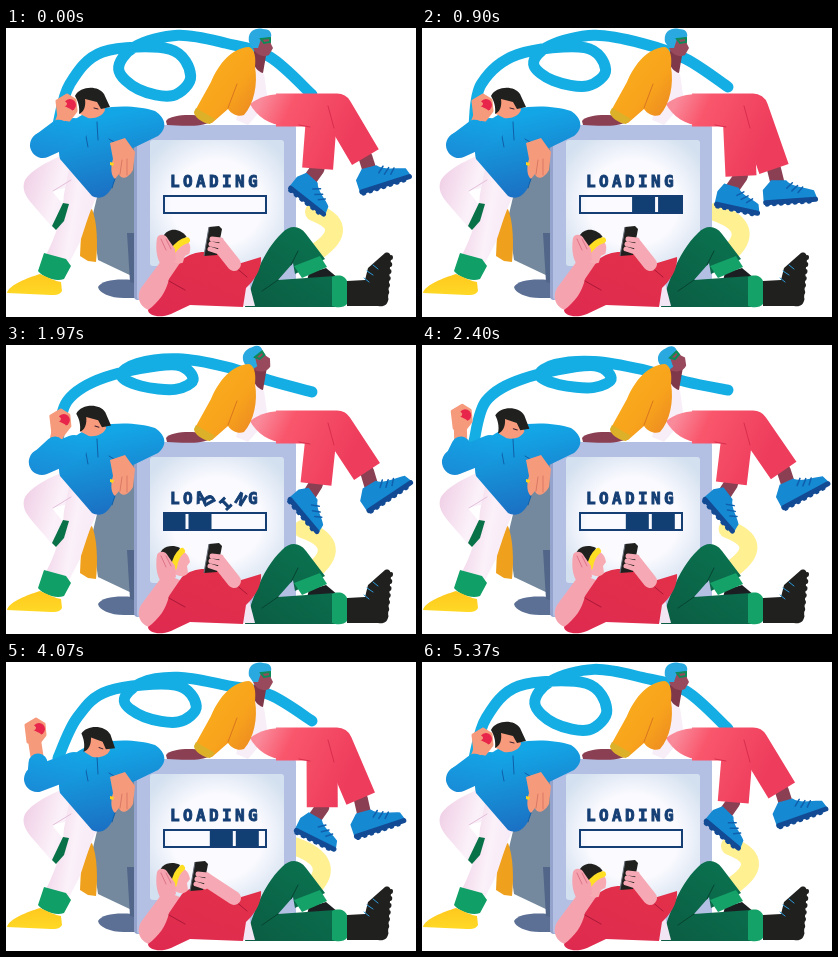
These frames come from a looping animation (410x289 px, 5410 ms). An HTML page:

```html
<!DOCTYPE html>
<html lang="en">
<head>
<meta charset="utf-8">
<title>Loading</title>
<style>
html, body { margin: 0; width: 100%; height: 100%; overflow: hidden; background: #fff; }
svg { display: block; width: 410px; height: 289px; }
.word { font: bold 16px "DejaVu Sans Mono", "Noto Sans Mono", monospace; fill: #153f74; stroke: #153f74; stroke-width: .9; }
.line { fill: none; stroke-linecap: round; stroke-linejoin: round; }
</style>
</head>
<body>
<svg viewBox="0 0 410 289">
  <defs>
    <linearGradient id="hoodie" x1="0" y1="0" x2=".25" y2="1">
      <stop offset=".2" stop-color="#13a6e6"/><stop offset="1" stop-color="#1b72c4"/>
    </linearGradient>
    <linearGradient id="sleeve" gradientUnits="userSpaceOnUse" x1="50" y1="85" x2="40" y2="134">
      <stop offset="0" stop-color="#13a6e6"/><stop offset="1" stop-color="#1a8ad6"/>
    </linearGradient>
    <linearGradient id="coral" gradientUnits="userSpaceOnUse" x1="245" y1="92" x2="335" y2="135">
      <stop offset="0" stop-color="#f98a9a"/><stop offset=".3" stop-color="#f9566c"/><stop offset="1" stop-color="#ee3c5c"/>
    </linearGradient>
    <linearGradient id="jacket" x1="0" y1="0" x2="1" y2="1">
      <stop offset="0" stop-color="#fbb01c"/><stop offset=".6" stop-color="#f8a31c"/><stop offset="1" stop-color="#e98423"/>
    </linearGradient>
    <linearGradient id="shirt" x1="0" y1="1" x2=".7" y2="0">
      <stop offset="0" stop-color="#df2a50"/><stop offset="1" stop-color="#e2304a"/>
    </linearGradient>
    <linearGradient id="white" x1="0" y1=".3" x2="1" y2=".6">
      <stop offset="0" stop-color="#f0cfe6"/><stop offset=".5" stop-color="#fbf1f9"/><stop offset="1" stop-color="#f4e6f5"/>
    </linearGradient>
    <linearGradient id="green" x1="0" y1="1" x2=".8" y2="0">
      <stop offset="0" stop-color="#0b5c42"/><stop offset="1" stop-color="#0a7350"/>
    </linearGradient>
    <linearGradient id="yellow" x1="0" y1="0" x2="0" y2="1">
      <stop offset="0" stop-color="#ffc81c"/><stop offset="1" stop-color="#ffd927"/>
    </linearGradient>
    <radialGradient id="glass" r=".62">
      <stop offset=".55" stop-color="#fafaff"/><stop offset="1" stop-color="#d3e0ef"/>
    </radialGradient>
    <clipPath id="slot"><path d="M158 168h103v17h-103z"/></clipPath>
  </defs>

  <path id="cable" class="line" stroke="#14aee4" stroke-width="11"/>
  <path id="tail" class="line" stroke="#fff092" stroke-width="18"/>

  <g id="monitor">
    <path d="M130 112L92 165L86 190L92 232L130 250Z" fill="#74899d"/>
    <path d="M92 259C96 251 116 250 136 253V270H118C104 270 93 265 92 259Z" fill="#5c7096"/>
    <path d="M121 205H133V256L124 254Z" fill="#516689"/>
    <rect x="128" y="98" width="14" height="174" rx="4" fill="#93a3cb"/>
    <rect x="131" y="97" width="159" height="175" rx="3" fill="#b3c0e4"/>
    <rect x="144" y="112" width="134" height="126" rx="3" fill="url(#glass)"/>
    <g id="letters" class="word"></g>
    <g clip-path="url(#slot)">
      <path id="blocks" d="M0 169h23v15h-23zM26 169h23v15h-23z" fill="#123f73"/>
    </g>
    <rect x="158" y="168" width="102" height="17" fill="none" stroke="#153f74" stroke-width="2"/>
  </g>

  <g id="sitter">
    <path d="M247 38L258 46L262 74L242 97L230 92Z" fill="#f8eef8"/>
    <path d="M250 18L261 22L257 45C252 44 247 38 246 30Z" fill="#7e3849"/>
    <g id="sitterHead">
      <path d="M247 10L264 7L265 16L267 20L263 27C258 30 250 27 247 20Z" fill="#984a5c"/>
      <path d="M243 14C241 3 250 -1 257 1C264 1 266 5 265 9L255 11L252 20L247 20Z" fill="#29a9df"/>
      <path d="M255 11L264 10L264 14L258 15Z" fill="none" stroke="#0c8a58" stroke-width="2"/>
    </g>
    <g class="line" stroke="#8b3f52" stroke-width="14">
      <path id="ankleR"/><path id="ankleL"/>
    </g>
    <path d="M244 76C255 68 265 66 278 66V98C264 97 250 88 244 76Z" fill="url(#coral)"/>
    <g class="line" stroke="url(#coral)" stroke-width="31" style="stroke-linecap:butt">
      <path id="legR"/>
      <path id="legL"/>
    </g>
    <path class="line" d="M304 99L293 97M328 100L322 78" stroke="#d92d4e"/>
    <g id="shoeR"></g>
    <g id="shoeL"></g>
    <path d="M160 93C164 87 183 86 196 88L204 94C197 99 176 98 161 97Z" fill="#8b3f52"/>
    <path d="M243 19C226 20 213 35 205 54L190 81C188 88 197 95 206 95L222 81C226 87 233 89 238 87C248 76 252 56 249 39C250 30 249 21 243 19Z" fill="url(#jacket)"/>
    <path d="M190 80L209 91L204 96C196 95 188 89 188 84Z" fill="#dcb029"/>
    <path class="line" d="M222 80L231 56" stroke="#d97620"/>
  </g>

  <g id="leaner">
    <path d="M76 186L86 181C91 193 92 215 90 234L82 233L74 228Z" fill="#efa01d"/>
    <path d="M60 126C44 132 25 142 19 152C15 161 20 169 27 177L46 199L58 178L46 163L88 153Z" fill="url(#white)"/>
    <path d="M64 137L96 160C85 176 80 197 74 214L62 237L40 227C50 208 57 186 58 166Z" fill="url(#white)"/>
    <path d="M46 198L57 175L63 176L58 193L50 202Z" fill="#087147"/>
    <path class="line" d="M47 163L65 152" stroke="#e3bfda"/>
    <path d="M38 225L60 231L65 238L58 251C50 254 38 250 32 243Z" fill="#109f66"/>
    <path d="M34 246C43 250 49 253 55 254L56 263C54 267 50 267 45 267L1 265C3 257 21 250 34 246Z" fill="url(#yellow)"/>
    <path d="M76 87C94 77 128 76 149 83C161 91 161 101 152 108L121 123L107 157C102 169 94 172 86 168L54 131C50 113 59 96 76 87Z" fill="url(#hoodie)"/>
    <path class="line" d="M78 98L82 119M91 94L92 112M118 120L103 111M121 123C113 138 109 150 106 160" stroke="#105fa8"/>
    <path d="M104 115L119 110L129 124L127 142C122 151 115 152 113 146L109 151C104 147 105 137 107 131Z" fill="#f69a7c"/>
    <path class="line" d="M116 132L114 146M121 131L121 147" stroke="#d97865"/>
    <path d="M104 134L108 135L107 138L104 137Z" fill="#ffd21d"/>
    <g id="leanerHead">
      <path d="M75 69L97 70L99 82C97 88 89 91 82 90L74 86Z" fill="#f79b7c"/>
      <path d="M69 68C74 58 92 57 98 66L104 79L95 81L91 74L79 71C80 78 78 84 73 86C74 79 72 73 69 68Z" fill="#20211f"/>
      <path class="line" d="M88 80L92 81" stroke="#3b2030"/>
    </g>
    <path id="forearm" class="line" stroke="#f69a7c" stroke-width="13"/>
    <path id="arm" class="line" stroke="url(#sleeve)" stroke-width="26"/>
    <path id="cuff" class="line" stroke="url(#sleeve)" stroke-width="19"/>
    <g id="apple">
      <path d="M-13 -4L-3 -10L5 -5L6 6L-1 15L-11 13Z" fill="#f69a7c" stroke="#f69a7c" stroke-width="3" stroke-linejoin="round"/>
      <circle r="6" fill="#e8254a"/>
      <path class="line" d="M-8 2L-4 4L0 6M-8 -3L-5 -1" stroke="#f69a7c" stroke-width="4"/>
    </g>
  </g>

  <g id="reader">
    <path d="M303 245L320 240L332 250L326 256H300Z" fill="#1c1f22"/>
    <path d="M341 253L359 252L362 240L379 225C385 223 386 229 384 239L382 271C382 277 378 279 372 278H341Z" fill="#20211f"/>
    <path class="line" d="M385 229L380 275" stroke="#20211f" stroke-width="4" stroke-dasharray="1 6"/>
    <path class="line" d="M358 250L363 254M361 243L367 247M367 237L372 241" stroke="#2e9bdc"/>
    <path d="M239 279C247 252 257 223 276 205C284 197 293 197 300 206L319 231L289 246L287 235L272 252L329 248V279Z" fill="url(#green)"/>
    <path class="line" d="M272 252L256 263M285 237L292 223" stroke="#074330"/>
    <path d="M288 238L314 228L321 239L296 250Z" fill="#14a268"/>
    <path d="M326 249C333 246 339 248 341 253V276C338 280 331 280 326 278Z" fill="#14a268"/>
    <path d="M235 264L242 251L249 278H236Z" fill="#f2e6f5"/>
    <path d="M158 229L174 235L166 258L180 262L151 283C138 284 128 273 135 260Z" fill="#f6a3b0"/>
    <path d="M176 232C191 219 215 223 232 236L255 229C256 241 248 253 240 260L237 279L184 277L165 286C153 291 142 287 142 282C153 274 160 264 163 251Z" fill="url(#shirt)"/>
    <path class="line" d="M163 253L179 262M228 238L241 249" stroke="#aa1838"/>
    <g id="readerHead">
      <path d="M173 206C181 206 183 212 184 217L181 221L182 228C177 234 168 231 164 223Z" fill="#f8aab2"/>
      <path d="M153 213C153 203 164 198 174 203L168 216L160 222Z" fill="#20211f"/>
      <path class="line" d="M176 206C171 210 169 215 168 222" stroke="#ffdf24" stroke-width="6"/>
    </g>
    <path d="M151 210C153 205 160 206 162 211L169 221L170 232L158 240C151 234 149 222 151 210Z" fill="#f6a3b0"/>
    <path class="line" d="M155 211L160 222M160 211L165 221" stroke="#dc7488"/>
    <path id="readerArm" class="line" stroke="#f6a9b4" stroke-width="14"/>
    <g id="phone">
      <path d="M203 199L213 198L216 201L211 227L198 228Z" fill="#20211f"/>
      <path d="M203 199L198 228" stroke="#6a6f7a" fill="none"/>
      <path class="line" d="M206 211L215 212M205 216L214 218M204 221L213 224" stroke="#f6a9b4" stroke-width="5"/>
    </g>
  </g>
</svg>

<script>
const LOOP = 5410;
const RUNS = [43, 1600, 3270];
const el = id => document.getElementById(id);
const draw = (id, d) => el(id).setAttribute("d", d);
const place = (id, x, y, turn = 0, px = 0, py = 0) =>
  el(id).setAttribute("transform", `translate(${x} ${y}) rotate(${turn} ${px} ${py})`);

// Cosine with a whole number of cycles per loop; shift is a part of one cycle.
const wave = (t, cycles = 1, shift = 0) => Math.cos(2 * Math.PI * (cycles * t / LOOP + shift));
const ease = u => (u = Math.min(1, Math.max(0, u))) * u * (3 - 2 * u);
// Rises from 0 to 1 between a and b, falls back between c and d.
const hold = (t, a, b, c, d) => ease((t - a) / (b - a)) - ease((t - c) / (d - c));

function spline(pts) {
  let d = `M${pts[0]}`;
  for (let i = 0; i < pts.length - 1; i++) {
    const [a, b, c, e] = [pts[i - 1] || pts[i], pts[i], pts[i + 1], pts[i + 2] || pts[i + 1]];
    d += `C${b.map((v, k) => v + (c[k] - a[k]) / 6)} ${c.map((v, k) => v - (e[k] - b[k]) / 6)} ${c}`;
  }
  return d;
}

for (const ch of "LOADING") {
  const letter = document.createElementNS("http://www.w3.org/2000/svg", "text");
  letter.textContent = ch;
  el("letters").append(letter);
}
for (const [id, half] of [["shoeL", 23], ["shoeR", 27]]) {
  el(id).innerHTML =
    `<path d="M${-half} -4L-18 -13L-3 -12C2 -5 14 -4 ${half - 3} 0L${half} 9L${-half} 9Z" fill="#1689d3"/>` +
    `<path class="line" d="M${2 - half} 9H${half - 2}" stroke="#124a94" stroke-width="5"/>` +
    `<path class="line" d="M${3 - half} 11H${half - 3}" stroke="#124a94" stroke-width="4" stroke-dasharray="1 6"/>` +
    `<path class="line" d="M-3 -4L3 -9M2 -1L8 -6M8 1L13 -4" stroke="#0f5fac" stroke-width="1.5"/>`;
}

function drawCable(t) {
  const cx = 151.5 - 4 * wave(t, 1, -.125), cy = 36 + 6 * wave(t, 1, .08);
  const rx = 36, ry = 19.5 + 7 * wave(t, 1, .03);
  const crest = 12.5 - 6 * wave(t, 1, -.08);
  draw("cable", spline([
    [52, 96], [65 - 6 * wave(t, 1, -.22), 56], [cx - 52, 29 - 5 * wave(t)],
    [cx + .42 * rx, cy - .76 * ry], [cx + rx, cy + .25 * ry],
    [cx + .5 * rx, cy + ry], [cx - .45 * rx, cy + .76 * ry], [cx - rx, cy],
    [cx - .55 * rx, cy - .85 * ry], [172, crest], [220, crest + 8],
    [264, 33 - 4 * wave(t)], [306, 56 + 11 * wave(t, 1, .04)]
  ]));
  const sway = wave(t, 2);
  draw("tail", `M${298 + 10 * sway} 184Q${342 + 8 * sway} 200 304 228`);
}

function drawLeg(side, hip, knee, hem, shoe, turn) {
  const a = turn * Math.PI / 180, [sx, sy] = shoe;
  draw("leg" + side, `M${hip}L${knee}L${hem}`);
  draw("ankle" + side, `M${hem}L${sx - 11 * Math.cos(a) + 5 * Math.sin(a)} ${sy - 11 * Math.sin(a) - 5 * Math.cos(a)}`);
  place("shoe" + side, sx, sy, turn);
}

function drawSitter(t) {
  const s = wave(t, 2, .17);
  drawLeg("R", [270, 81], [331, 81], [357 + 5 * s, 133 - 8 * s],
    [374 + 6 * s, 153 - 11 * s], -18 + 16 * wave(t, 2, -.25));
  drawLeg("L", [270, 83], [316, 83], [314 - 5 * s, 143 - 5 * s],
    [310 - 7 * s, 168 - 4 * s], 32 + 20 * wave(t, 2, .2));
  place("sitterHead", 0, 0, -38 * hold(t, 1000, 2300, 2500, 4000), 254, 22);
}

function drawLeaner(t) {
  const away = hold(t, 1600, 2900, 4200, 5100);
  const elbow = 37 - 6 * away, wx = 53 - 21 * away, wy = 101;
  const px = 64 - 31 * away, py = 77 - 10 * away;
  draw("arm", `M68 103L${elbow} 117`);
  draw("cuff", `M${elbow} 113L${wx} ${wy}`);
  draw("forearm", `M${wx} ${wy}L${px - 5} ${py + 8}`);
  place("apple", px, py);
  place("leanerHead", 4 * away, 5 * away, 6 * away, 84, 90);
}

function drawReader(t) {
  const near = hold(t, 2500, 3200, 4300, 5100);
  const up = 1 - hold(t, 1000, 1500, 4300, 5100);
  place("phone", -14 * near, near);
  place("readerHead", 0, 0, 26 * up, 165, 220);
  draw("readerArm", `M228 236L${213 - 14 * near} 217`);
}

function drawScreen(t) {
  const start = RUNS.filter(s => s <= t).pop();
  const p = start === undefined ? -1 : t - start;
  place("blocks", p < 0 ? 262 : 115.7 + .11 * p, 0);
  [...el("letters").children].forEach((letter, i) => {
    const u = (p - i * 70) / 240;
    const turn = u > 0 && u < 1 ? u * 360 : 0;
    letter.setAttribute("transform", `translate(${164 + i * 13} 158.5) rotate(${turn} 3 -3)`);
  });
}

function render(now) {
  const t = now % LOOP;
  drawCable(t);
  drawScreen(t);
  drawSitter(t);
  drawLeaner(t);
  drawReader(t);
  requestAnimationFrame(() => render(performance.now() - origin));
}
const origin = performance.now();
render(0);
</script>
</body>
</html>
```
